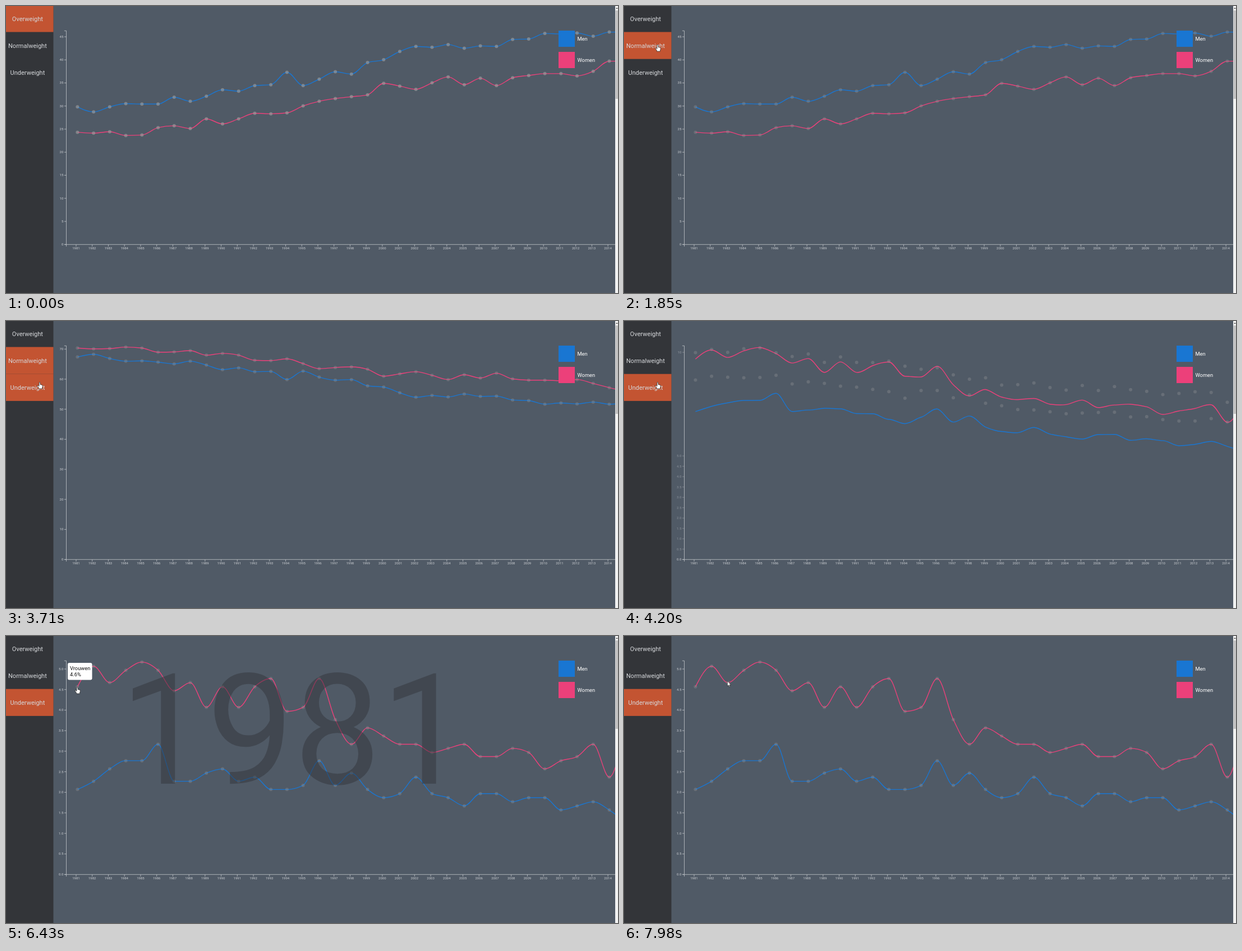
An HTML page for the animation above (8 s loop, 1091 by 513 pixels).

```html
<!DOCTYPE html>
<html lang="en">
<head>
<meta charset="utf-8">
<title>Weight chart</title>
<style>
html, body { margin: 0; width: 100%; height: 100%; overflow: hidden; background: #505a66; }
svg { display: block; width: 100vw; height: 100vh; font-family: Roboto, Arial, sans-serif; }
.axis path { fill: none; stroke: #c3c7cc; stroke-width: .8; }
.axis text { fill: #cdd0d4; font-size: 6px; }
.line { fill: none; stroke-width: 1.4; }
.menu text { fill: #d6d8db; font-size: 11px; text-anchor: middle; }
.legend text { fill: #fff; font-size: 9.3px; }
#tip text { fill: #111; font-size: 9.3px; }
#year { fill: #32353a; fill-opacity: .5; font-size: 276px; }
#cursor path { fill: #fff; stroke: #222; stroke-width: .7; stroke-linejoin: round; }
</style>
</head>
<body>
<svg viewBox="0 0 1091 513" preserveAspectRatio="none">
  <rect width="1091" height="513" fill="#505a66"/>
  <g class="axis" id="xAxis"></g>
  <g class="axis"><path d="M103.9 44.3H107.5V426.3H103.9"/><g id="yTicks"></g></g>
  <g id="plot"></g>
  <text id="year" x="203" y="264"></text>
  <g class="legend">
    <rect x="985" y="44" width="29" height="29" fill="#1976d2"/>
    <rect x="985" y="82" width="29" height="29" fill="#ec407a"/>
    <text x="1018.5" y="61.8">Men</text>
    <text x="1018.5" y="99.6">Women</text>
  </g>
  <g class="menu">
    <rect width="84.5" height="513" fill="#333539"/>
    <g id="menu"></g>
  </g>
  <g id="tip">
    <rect width="43.5" height="30.5" rx="3" fill="#fff"/>
    <text x="4" y="13">Vrouwen</text>
    <text id="tipValue" x="4" y="24.5"></text>
  </g>
  <g>
    <rect x="1086" width="5" height="513" fill="#f1f1f1"/>
    <rect x="1086.6" y="8" width="4.4" height="158" fill="#c1c1c1"/>
    <path d="M1087.2 5L1089 2.8 1090.8 5Z" fill="#505050"/>
  </g>
  <g id="cursor">
    <path id="arrow" d="M0 0V9.2L2.1 7.3 3.6 10.6 5 10 3.6 6.8H6.4Z"/>
    <path id="hand" d="M-1 1Q0-.6 1 1V4.5L4 5.2Q5.6 5.6 5.4 7.5L4.6 10V12H-1.5V10.5L-4 7Q-4.2 5.6-2.8 6L-1 7.5Z"/>
  </g>
</svg>
<script>
const $ = id => document.getElementById(id);
const LOOP = 8000, BASE = 426, HEIGHT = 382, STEP = 28.73;
const COLORS = ['#1976d2', '#ec407a'];

// percentages per year from 1981; men first, then women
const over = [
  [30.1, 29, 30.1, 30.8, 30.7, 30.7, 32.2, 31.3, 32.4, 33.8, 33.5, 34.7, 34.9, 37.6, 34.7, 36.1, 37.7, 37.2,
   39.7, 40.3, 42.1, 43.2, 43, 43.6, 42.8, 43.3, 43.2, 44.7, 44.8, 46, 45.9, 46.1, 45.4, 46.3, 46.3],
  [24.6, 24.4, 24.7, 23.9, 24, 25.6, 26, 25.4, 27.5, 26.4, 27.5, 28.7, 28.6, 28.8, 30.3, 31.3, 31.9, 32.3,
   32.7, 35.2, 34.6, 33.9, 35.3, 36.6, 34.9, 36.3, 34.7, 36.4, 36.9, 37.3, 37.3, 36.8, 37.8, 40, 40]
];
const under = [
  [2.1, 2.3, 2.6, 2.8, 2.8, 3.2, 2.3, 2.3, 2.5, 2.6, 2.3, 2.4, 2.1, 2.1, 2.2, 2.8, 2.2, 2.5,
   2.1, 1.9, 2, 2.4, 2, 1.9, 1.7, 2, 2, 1.8, 1.9, 1.9, 1.6, 1.7, 1.8, 1.6, 1.3],
  [4.6, 5.1, 4.7, 5, 5.2, 5, 4.5, 4.7, 4.1, 4.6, 4.1, 4.6, 4.8, 4, 4.1, 4.8, 3.8, 3.2,
   3.6, 3.4, 3.2, 3.2, 3, 3.1, 3.2, 2.9, 2.9, 3.1, 3, 2.6, 2.8, 2.9, 3.2, 2.4, 3.7]
];
const normal = over.map((row, g) => row.map((v, i) => 100 - v - under[g][i]));

const clamp = v => Math.max(0, Math.min(1, v));
const lerp = (a, b, p) => a + (b - a) * p;
const cubic = t => t < .5 ? 4 * t ** 3 : 1 - 4 * (1 - t) ** 3;
const smooth = t => t * t * (3 - 2 * t);
const dotX = i => 127.4 + STEP * i;

// tangents of a monotone cubic through evenly spaced points
function tangents(y) {
  const s = y.slice(1).map((v, i) => (v - y[i]) / STEP);
  const m = y.map((_, i) => {
    const a = s[i - 1], b = s[i];
    if (a === undefined || b === undefined) return 0;
    return (Math.sign(a) + Math.sign(b)) * Math.min(Math.abs(a), Math.abs(b), Math.abs(a + b) / 4);
  });
  const n = y.length - 1;
  m[0] = (3 * s[0] - m[1]) / 2;
  m[n] = (3 * s[n - 1] - m[n - 1]) / 2;
  return m;
}

function chart(rows, max, step, digits) {
  const k = HEIGHT / max, ticks = [];
  for (let n = 0; n * step <= max; n++) ticks.push(n * step);
  const series = rows.map(row => {
    const y = row.map(v => BASE + 2.6 - v * k);
    return { y, m: tangents(y) };
  });
  return { series, ticks, digits, pos: v => BASE - v * k };
}
const charts = [chart(over, 46.3, 5, 0), chart(normal, 71.1, 10, 0), chart(under, 5.2, .5, 1)];

const CLICKS = [1837, 3835];
const HOVERS = [{ i: 0, on: 5880, off: 6600 }, { i: 1, on: 6880, off: 7430 }];
const MOVES = [
  [70, 1017, 489], [820, 127, 198], [900, 127, 198], [1230, 59, 61], [1690, 59, 61], [1700, 60, 62],
  [1780, 60, 62], [1850, 60, 69], [3050, 60, 69], [3480, 60, 109], [4990, 60, 109], [5280, 115, 125],
  [5820, 122, 95], [5900, 127, 91], [6530, 127, 91], [6900, 156, 54], [7390, 156, 54], [7900, 184.3, 80.5]
];
const MENU = ['Overweight', 'Normalweight', 'Underweight'];
const menuTop = i => i ? 46.5 + 48.2 * (i - 1) : 0;

$('menu').innerHTML = MENU.map((name, i) =>
  `<rect y="${menuTop(i)}" width="84.5" height="${menuTop(i + 1) - menuTop(i)}" fill="#c35432"/>
   <text x="38.4" y="${26.5 + 48.1 * i}">${name}</text>`).join('');
const menuRects = $('menu').querySelectorAll('rect');

let marks = '<path d="M107.5 429.9V426.3H1086"/>';
for (let i = 0; i < 34; i++) {
  const x = 125 + STEP * i;
  marks += `<path d="M${x} 426.3v3.6"/><text x="${x}" y="435.2" text-anchor="middle">${1981 + i}</text>`;
}
$('xAxis').innerHTML = marks;

$('plot').innerHTML = COLORS.map(c => `<path class="line" stroke="${c}"/>`).join('') +
  '<circle r="3" fill="#a0a0a0"/>'.repeat(70);
const lines = $('plot').querySelectorAll('path');
const dots = $('plot').querySelectorAll('circle');

function linePath(a, b, p) {
  const y = a.y.map((v, i) => lerp(v, b.y[i], p));
  const m = a.m.map((v, i) => lerp(v, b.m[i], p) * STEP / 3);
  let d = `M${dotX(0)} ${y[0]}`;
  for (let i = 1; i < y.length; i++) {
    d += `C${dotX(i - 1) + STEP / 3} ${y[i - 1] + m[i - 1]} ${dotX(i) - STEP / 3} ${y[i] - m[i]} ${dotX(i)} ${y[i]}`;
  }
  return d;
}

function drawTicks(a, b, p) {
  const all = [...new Set([...a.ticks, ...b.ticks])];
  $('yTicks').innerHTML = all.map(v => {
    const y = lerp(a.pos(v), b.pos(v), p);
    const stays = b.ticks.includes(v);
    const alpha = !stays ? 1 - p : a.ticks.includes(v) ? 1 : p;
    if (y < -10 || alpha <= 0) return '';
    const label = v.toFixed(stays ? b.digits : a.digits);
    return `<g opacity="${alpha}"><path d="M103.9 ${y + .3}h3.6"/>` +
      `<text x="102.3" y="${y + 2.2}" text-anchor="end">${label}</text></g>`;
  }).join('');
}

function drawPlot(t, sel) {
  const a = charts[Math.max(0, sel - 1)], b = charts[sel];
  const age = sel ? t - CLICKS[sel - 1] : 0;
  const p = cubic(clamp(age / 750)), q = cubic(clamp(age / 1000));
  drawTicks(a, b, p);
  lines.forEach((el, g) => el.setAttribute('d', linePath(a.series[g], b.series[g], p)));
  dots.forEach((el, n) => {
    const g = n < 35 ? 0 : 1, i = n % 35;
    el.setAttribute('cx', dotX(i));
    el.setAttribute('cy', lerp(a.series[g].y[i], b.series[g].y[i], q));
    el.setAttribute('opacity', sel ? .3 : .6);
  });
}

function drawHover(t) {
  const h = HOVERS.filter(h => t >= h.on).pop();
  const alpha = h ? clamp((t - h.on) / 500) * (1 - clamp((t - h.off) / 500)) : 0;
  $('tip').setAttribute('opacity', alpha);
  $('year').setAttribute('opacity', alpha);
  if (!h) return;
  const y = charts[2].series[1].y[h.i];
  $('tip').setAttribute('transform', `translate(${dotX(h.i) - 17.4} ${y - 42.7})`);
  $('tipValue').textContent = under[1][h.i].toFixed(1) + '%';
  $('year').textContent = 1981 + h.i;
}

function cursorAt(t) {
  const n = MOVES.findIndex(m => m[0] > t);
  if (n < 0) return MOVES[MOVES.length - 1].slice(1);
  if (!n) return null;
  const a = MOVES[n - 1], b = MOVES[n];
  const p = smooth((t - a[0]) / (b[0] - a[0]));
  return [lerp(a[1], b[1], p), lerp(a[2], b[2], p)];
}

function drawPointer(t, sel) {
  const at = cursorAt(t);
  const inMenu = at && at[0] < 84.5;
  menuRects.forEach((el, i) => {
    const hover = inMenu && at[1] >= menuTop(i) && at[1] < menuTop(i + 1);
    el.setAttribute('visibility', i === sel || hover ? 'visible' : 'hidden');
  });
  $('cursor').setAttribute('visibility', at ? 'visible' : 'hidden');
  if (!at) return;
  const hand = inMenu || HOVERS.some(h => t >= h.on && t < h.off);
  $('cursor').setAttribute('transform', `translate(${at[0]} ${at[1]})`);
  $('hand').setAttribute('display', hand ? 'inline' : 'none');
  $('arrow').setAttribute('display', hand ? 'none' : 'inline');
}

function draw(t) {
  const sel = CLICKS.filter(c => t >= c).length;
  drawPlot(t, sel);
  drawHover(t);
  drawPointer(t, sel);
}

const start = performance.now();
function tick() {
  draw((performance.now() - start) % LOOP);
  requestAnimationFrame(tick);
}
tick();
</script>
</body>
</html>
```
